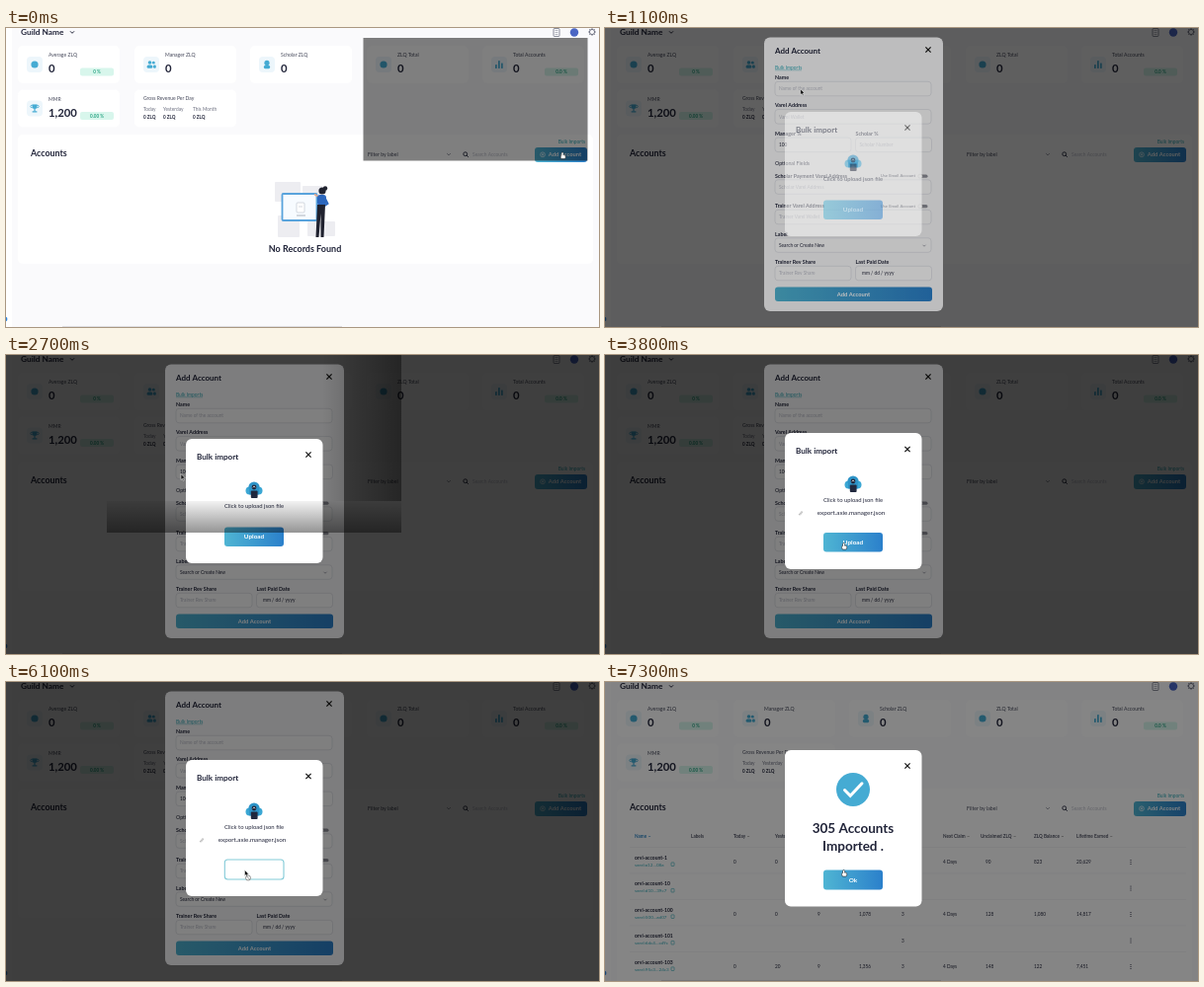
Animation of 600x303 px, one loop 7500 ms. Source, as an HTML page with a canvas:

```html
<!DOCTYPE html>
<html lang="en">
<head>
<meta charset="utf-8">
<title>Bulk import</title>
<style>
html,body{margin:0;width:100%;height:100%;overflow:hidden;background:#fff}
canvas{display:block;width:600px;height:303px}
</style>
</head>
<body>
<canvas id="stage"></canvas>
<script>
const W = 600, H = 303, LOOP = 7500, STEP = 100;
const UI = 'Lato, "Open Sans", sans-serif', SYS = 'Inter, Roboto, sans-serif';
const INK = '#22253a', SOFT = '#6d7080', HINT = '#bcbec9', TEAL = '#2fa8b5', BLUE = '#45abd3';
const cv = document.getElementById('stage'), c = cv.getContext('2d');
const dpr = window.devicePixelRatio || 1;
cv.width = W * dpr; cv.height = H * dpr;

// helpers
function text(s, x, y, size, color = INK, weight = 400, align = 'left', family = UI) {
  c.font = `${weight} ${size}px ${family}`;
  c.fillStyle = color; c.textAlign = align;
  c.fillText(s, x, y);
}
function box(x, y, w, h, r, fill, stroke, lw = .6) {
  c.beginPath(); c.roundRect(x, y, w, h, r);
  if (fill) { c.fillStyle = fill; c.fill(); }
  if (stroke) { c.strokeStyle = stroke; c.lineWidth = lw; c.stroke(); }
}
function dot(x, y, r, fill) {
  c.beginPath(); c.arc(x, y, r, 0, 7); c.fillStyle = fill; c.fill();
}
function line(pts, color, lw = 1) {
  c.beginPath();
  pts.forEach(([x, y], i) => i ? c.lineTo(x, y) : c.moveTo(x, y));
  c.strokeStyle = color; c.lineWidth = lw; c.stroke();
}
function poly(pts, fill) {
  c.beginPath();
  pts.forEach(([x, y]) => c.lineTo(x, y));
  c.closePath(); c.fillStyle = fill; c.fill();
}
function clipTo(x, y, w, h, draw) {
  c.save(); c.beginPath(); c.rect(x, y, w, h); c.clip(); draw(); c.restore();
}
function faded(a, draw) {
  if (a <= 0) return;
  c.save(); c.globalAlpha = a; draw(); c.restore();
}
const chevron = (x, y, s, col, lw = .8) => line([[x - s, y - s / 2], [x, y + s / 2], [x + s, y - s / 2]], col, lw);
const shade = a => { c.fillStyle = `rgba(0,0,0,${a})`; c.fillRect(0, 0, W, H); };
function cross(x, y) {
  line([[x - 2.6, y - 2.6], [x + 2.6, y + 2.6]], '#111', 1.2);
  line([[x + 2.6, y - 2.6], [x - 2.6, y + 2.6]], '#111', 1.2);
}
function button(x, y, w, h, label, size = 6, dx = 0) {
  const g = c.createLinearGradient(x, 0, x + w, 0);
  g.addColorStop(0, '#4fb5d3'); g.addColorStop(1, '#2b80cb');
  box(x, y, w, h, 3, g);
  text(label, x + w / 2 + dx, y + h / 2 + size * .34, size, '#fff', 700, 'center');
}

// dashboard
const icons = {
  blob(x, y) { dot(x, y, 3.6, BLUE); },
  users(x, y) {
    dot(x - 1.5, y - 2, 1.8, BLUE); dot(x + 2.3, y - 1.8, 1.4, BLUE);
    box(x - 4.4, y + .6, 5.8, 3.2, 1.5, BLUE); box(x + 2, y + .6, 2.8, 3.2, 1.2, BLUE);
  },
  person(x, y) { dot(x, y - 1.6, 2.6, BLUE); box(x - 3.2, y + 1, 6.4, 3.2, 1.4, BLUE); },
  bars(x, y) { [[-4, 4], [-1, 8], [2, 5.5]].forEach(([d, h]) => box(x + d, y + 4 - h, 1.7, h, .4, BLUE)); },
  cup(x, y) {
    box(x - 2.4, y - 4, 4.8, 4.6, [0, 0, 2.4, 2.4], BLUE);
    box(x - 4.2, y - 3.2, 8.4, 2.4, 1.2, null, BLUE, .8);
    box(x - .6, y, 1.2, 3, 0, BLUE); box(x - 2.4, y + 2.8, 4.8, 1.2, .3, BLUE);
  }
};
function card(x, y, icon, label, value, pill) {
  box(x, y, 103, 38, 5, '#fff');
  box(x + 9, y + 11, 16, 16, 4, '#edf6fb');
  icons[icon](x + 17, y + 19);
  text(label, x + 31, y + 11, 5.1, '#45485a');
  text(value, x + 31, y + 27, 11.3, INK, 700);
  if (pill) {
    box(x + 63, y + 22.5, 34, 8, 2, '#d8f6ec');
    text(pill, x + 80, y + 28.3, 4.6, '#29a483', 700, 'center');
  }
}
function emptyArt() {
  [[272, 156, 26, 20], [300, 160, 20, 14], [275, 190, 22, 22], [305, 196, 28, 15]]
    .forEach(r => box(...r, 1, '#ededf1'));
  box(279.5, 168, 35, 27, 1, '#f7fbff', '#58a3dc', 1.8);
  box(294, 177, 8, 10, 1, '#fff', '#b9c0cc', .6);
  line([[296, 181], [300, 181]], '#b9c0cc', .6);
  line([[294, 190], [303, 190]], '#8d94a3', .7);
  dot(320, 165, 3.6, '#20222f'); dot(323, 162.5, 2.2, '#20222f');
  line([[318, 172], [312, 168.5]], '#e3a98f', 1.6);
  box(315, 169, 9, 11, 3, '#2c67bd');
  line([[322, 171], [325.5, 178], [321, 181]], '#2c67bd', 2);
  poly([[315, 179], [323, 179], [321.5, 212], [318.5, 212], [318.5, 188], [316.5, 212], [313.5, 212]], '#20222f');
  text('No Records Found', 302.5, 227, 9, INK, 700, 'center');
}
const heads = [[30, 'Name'], [87, 'Labels'], [130, 'Today'], [172, 'Yesterday'], [215, 'Average'], [257, 'Total'],
  [300, 'Rank'], [342, 'Next Claim'], [380, 'Unclaimed ZLQ'], [434, 'ZLQ Balance'], [477, 'Lifetime Earned']];
const cols = [130, 172, 215, 257, 300, 342, 385, 434, 477];
const rows = [
  ['1', 'a12…08a', '0|0|9|1,078|3|4 Days|90|823|20,629'],
  ['10', 'd10…39c7', ''],
  ['100', '500…ad07', '0|0|9|1,078|3|4 Days|128|1,080|14,817'],
  ['101', '6dc4…cd9c', '||||3'],
  ['103', '95c3…24c3', '0|20|9|1,356|3|4 Days|148|122|7,451']
];
function table() {
  heads.forEach(([x, s], i) => {
    text(s, x, 158, 4.6, i ? '#4d5061' : '#2d86c4', 700);
    if (i !== 1) chevron(x + c.measureText(s).width + 3, 156.5, 1, i ? '#777' : '#2d86c4', .6);
  });
  rows.forEach(([id, addr, vals], i) => {
    const y = 179.5 + i * 26.5;
    line([[25, y - 12], [588, y - 12]], '#ececf0', .6);
    text('orvi-account-' + id, 30, y, 5, INK, 700);
    text('varel:' + addr, 30, y + 7, 4.6, TEAL);
    box(67, y + 3.4, 3, 3.6, .5, null, TEAL, .6);
    vals.split('|').forEach((v, k) => text(v, cols[k], y + 4.5, 4.7));
    [-2, 0, 2].forEach(d => dot(532, y + 3 + d, .6, INK));
  });
}
function page(full) {
  c.fillStyle = '#fff'; c.fillRect(0, 0, W, H);
  c.fillStyle = '#fafafc'; c.fillRect(6, 0, W - 6, H);
  text('Guild Name', 15, 7, 8.3, INK, 700);
  chevron(67, 4.3, 2, INK, 1);
  box(554, .5, 6, 8, 1, null, SOFT, .8);
  [2.5, 4.5, 6.5].forEach(y => line([[555.5, y], [558.5, y]], SOFT, .5));
  dot(575, 4.5, 4.2, '#4b66c4');
  c.beginPath(); c.arc(593, 4, 2.6, 0, 7); c.strokeStyle = SOFT; c.lineWidth = 1; c.stroke();
  for (let a = 0; a < 6.2; a += Math.PI / 4)
    line([[593 + 2.8 * Math.cos(a), 4 + 2.8 * Math.sin(a)], [593 + 3.9 * Math.cos(a), 4 + 3.9 * Math.sin(a)]], SOFT, .9);

  card(12, 18, 'blob', 'Average ZLQ', '0', '0 %');
  card(130, 18, 'users', 'Manager ZLQ', '0');
  card(247, 18, 'person', 'Scholar ZLQ', '0');
  card(365, 18, 'blob', 'ZLQ Total', '0');
  card(482, 18, 'bars', 'Total Accounts', '0', '0.0 %');
  card(12, 62.5, 'cup', 'MMR', '1,200', '0.00 %');
  box(130, 62.5, 103, 38, 5, '#fff');
  text('Gross Revenue Per Day', 139, 73, 5, '#45485a');
  [[139, 'Today'], [159, 'Yesterday'], [189, 'This Month']].forEach(([x, s]) => {
    text(s, x, 84, 4.8, SOFT); text('0 ZLQ', x, 92, 4.6, INK, 700);
  });

  box(12, 108, 582, full ? 200 : 131, 5, '#fff');
  text('Accounts', 25, 129.5, 8.9, INK, 700);
  text('Filter by label', 366, 130, 5.2, '#45485a');
  chevron(448, 128, 1.8, SOFT, .7);
  c.beginPath(); c.arc(464.7, 127.7, 1.9, 0, 7); c.strokeStyle = INK; c.lineWidth = .9; c.stroke();
  line([[466, 129], [467.8, 130.8]], INK, .9);
  text('Search Accounts', 472, 130, 4.9, HINT);
  text('Bulk Imports', 586, 117, 4.9, TEAL, 400, 'right');
  button(535, 121, 53, 15, 'Add Account', 5.8, 4);
  c.beginPath(); c.arc(543, 128.3, 2.4, 0, 7); c.strokeStyle = '#fff'; c.lineWidth = .6; c.stroke();
  line([[541.8, 128.3], [544.2, 128.3]], '#fff', .6); line([[543, 127.1], [543, 129.5]], '#fff', .6);
  full ? table() : emptyArt();
  dot(-1, 295, 2.4, '#2d86e0');
  line([[57, 302.5], [340, 302.5]], '#dedee2', 1);
}

// dialogs
function field(label, x, y, w, hint, dark) {
  text(label, x, y, 5.3, INK, 700);
  box(x, y + 2.3, w, 14.5, 3, '#fff', '#d5d7df');
  text(hint, x + 4, y + 11.4, 4.8, dark ? INK : HINT);
}
function toggle(y) {
  text('Use Email Account', 314, y, 4.3, INK, 400, 'right');
  box(317.5, y - 2.6, 9, 3.2, 1.6, '#8f9099');
  dot(319, y - 1, 2.1, '#fff');
  c.strokeStyle = '#bbb'; c.lineWidth = .4; c.stroke();
}
function addDialog() {
  box(161, 9.5, 181, 277.5, 6, '#fcfcfd');
  text('Add Account', 172, 26.3, 8, INK, 700);
  cross(327, 22);
  text('Bulk Imports', 172, 41.8, 4.9, TEAL);
  line([[172, 42.8], [199, 42.8]], TEAL, .4);
  field('Name', 172, 52, 158, 'Name of the account');
  field('Varel Address', 172, 80.3, 158, 'Varel Wallet');
  field('Manager %', 172, 108.8, 77, '100', true);
  field('Scholar %', 253.5, 108.8, 77, 'Scholar Number');
  text('Optional Fields', 172, 138.8, 5.3);
  field('Scholar Payment Varel Address', 172, 151.5, 158, 'Scholar Varel Address');
  toggle(151.2);
  field('Trainer Varel Address', 172, 182, 158, 'Trainer Varel Wallet');
  toggle(181.7);
  field('Label', 172, 210.5, 158, 'Search or Create New', true);
  chevron(323, 220.5, 1.5, SOFT, .6);
  field('Trainer Rev Share', 172, 239, 77, 'Trainer Rev Share');
  field('Last Paid Date', 253.5, 239, 77, '  mm / dd / yyyy', true);
  button(172, 262.5, 159, 14.5, 'Add Account', 5.8);
}
function cloud(x, y) {
  dot(x - 4.5, y + 1, 4, '#3ba7d4'); dot(x + 4.5, y + 1, 4, '#3ba7d4');
  dot(x, y - 2.5, 5.6, '#2e94c8'); box(x - 5, y, 10, 5, 1, '#2e94c8');
  box(x - 3.2, y + 1, 6.8, 7.5, 1, '#20283e');
  dot(x, y - 2.5, 2.4, '#20283e');
  line([[x - 1.2, y - 2.2], [x, y - 3.6], [x + 1.2, y - 2.2]], '#fff', .7);
}
function fileName() {
  line([[196, 162], [199, 158.5], [199.6, 159.5], [197, 162.5]], '#888', .6);
  text('export.axie.manager.json', 249, 162, 6.3, INK, 400, 'center');
}
function bulkDialog(named, busy) {
  const d = named ? 6 : 0;
  box(182, 85 - d, 138.5, 126.5 + 2 * d - .5, 6, '#fff');
  text('Bulk import', 193, 106 - d, 8.1, INK, 700);
  cross(306, named ? 95.5 : 101);
  cloud(251, 136.5 - d);
  text('Click to upload json file', 251, 154.5 - d, 5.9, INK, 400, 'center');
  if (named) fileName();
  const y = named ? 180 : 174.5;
  if (busy) box(221.3, y, 59.7, 20, 3, '#fff', '#83cbd8', 1.1);
  else button(221, y, 60, 19.5, 'Upload', 6.4);
}
function tick() {
  dot(251, 109, 17, BLUE);
  c.lineCap = 'round';
  line([[242.5, 109.5], [248.2, 115.3], [260, 102.8]], '#fff', 3);
  c.lineCap = 'butt';
}
function partDone() {
  box(182, 79, 138.5, 138, 6, '#fff');
  cross(306, 95.5);
  tick();
  clipTo(205, 140, 70, 8.5, () => text('305 Accounts', 251, 152, 13.5, INK, 700, 'center'));
  text('file', 283, 148.5, 5.9, INK, 400, 'right');
  fileName();
  box(222, 180, 59, 20, 3, '#f6f6f8', '#ebebee');
  text('Upload', 251.5, 192, 6.2, '#c9c9cf', 700, 'center');
}
function doneDialog() {
  box(182, 69, 138.5, 158.5, 6, '#fff');
  cross(306, 85);
  tick();
  text('305 Accounts', 251, 152.5, 13.5, INK, 700, 'center');
  text('Imported .', 251, 170.5, 13.5, INK, 700, 'center');
  button(221, 190.5, 60, 20, 'Ok', 6.4);
}

// file picker
const sys = (s, x, y, size = 5, col = '#dcdcde', wt = 400, al = 'left') => text(s, x, y, size, col, wt, al, SYS);
function doc(x, y) {
  poly([[x, y], [x + 11, y], [x + 17, y + 6], [x + 17, y + 23], [x, y + 23]], '#ececec');
  poly([[x + 11, y], [x + 17, y + 6], [x + 11, y + 6]], '#bdbdbd');
  for (let i = 0; i < 6; i++) line([[x + 3, y + 5 + i * 2], [x + 6 + i * 3 % 5, y + 5 + i * 2]], '#b9b9b9', .5);
}
function picker() {
  box(101, -8, 300, 188, 5, '#1d1d1f', '#48484b', .8);
  box(102, -8, 53, 187, [0, 0, 0, 5], '#29292c');
  box(155, -8, 245, 30, 0, '#2c2c2f');
  line([[155, 0], [155, 179]], '#0d0d0e', .7);
  [[163, 8.5], [172.5, 8.5], [185, 16], [204, 16]].forEach(([x, w]) => box(x, 6.5, w, 7.5, 1.5, '#4c4c4f'));
  line([[168, 8.5], [166.3, 10.2], [168, 12]], '#999', .7);
  line([[176, 8.5], [177.7, 10.2], [176, 12]], '#999', .7);
  [189, 208].forEach(x => { for (let i = 0; i < 3; i++) box(x + i * 2, 9, 1.2, 2.6, 0, '#ccc'); chevron(x + 9, 10.3, 1, '#ccc', .6); });
  box(233, 6.5, 85, 7.5, 2, '#4c4c4f');
  box(243, 8, 6, 4.5, .8, '#39a9e6');
  sys('Downloads', 251, 12.2);
  box(310, 7, 7, 6.5, 1.5, '#2473e5');
  chevron(313.5, 11.6, 1.1, '#fff', .6);
  line([[312.4, 9.3], [313.5, 8.2], [314.6, 9.3]], '#fff', .6);
  box(335, 6.5, 58, 7.5, 2, '#343437', '#535356', .5);
  c.beginPath(); c.arc(340, 10, 1.4, 0, 7); c.strokeStyle = '#aaa'; c.lineWidth = .6; c.stroke();
  sys('Search', 345, 12.1, 5, '#98989b');

  box(104, 32.7, 50, 9, 2, '#4a4a4d');
  [['Favorites', 9], ['Locations', 53], ['Tags', 75.5]].forEach(([s, y]) => sys(s, 107, y, 4.2, '#858588', 600));
  [['Recents', 18], ['Desktop', 28.8], ['Downloads', 39], ['Network', 62]].forEach(([s, y], i) => {
    c.beginPath(); c.arc(111.5, y - 1.8, 1.9, 0, 7);
    c.strokeStyle = i < 3 ? '#3f97e8' : '#aaa'; c.lineWidth = .7; c.stroke();
    sys(s, 116.5, y);
  });
  [['Orange', '#f29b38'], ['Yellow', '#f4d23f'], ['Local', '#5fc454'], ['Dev', '#3a86f0'], ['Purple', '#a75bd1'], ['All Tags…', '#777']]
    .forEach(([s, col], i) => { const y = 84.3 + i * 10.4; dot(111.5, y - 1.8, 2, col); sys(s, 116.5, y); });

  [['Today', 30.5], ['Yesterday', 94], ['Previous 7 Days', 158]].forEach(([s, y]) => sys(s, 163, y, 5.3, '#b5b5b8', 600));
  line([[163, 33.5], [394, 33.5]], '#333336', .6);
  line([[163, 97], [394, 97]], '#333336', .6);
  doc(169, 40); sys('test.json', 177.5, 71, 4.9, '#eee', 400, 'center');
  doc(169, 104);
  sys('export.axie.mana', 177.5, 134, 4.7, '#eee', 400, 'center');
  sys('ger.json', 177.5, 141, 4.9, '#eee', 400, 'center');
  box(396.3, 24, 2.8, 48, 1.4, '#77777a');
  box(155.4, 158.5, 244, 20.5, [0, 0, 5, 0], '#2a2a2d');
  [[163, 28, 'Options', '#f0f0f0', '#5c5c5f'], [336, 26, 'Cancel', '#f0f0f0', '#5c5c5f'], [366, 27, 'Open', '#79797c', '#39393c']]
    .forEach(([x, w, s, col, bg]) => { box(x, 165, w, 7.6, 1.8, bg); sys(s, x + w / 2, 170.6, 4.8, col, 400, 'center'); });
}
function pickerShadow() {
  const g = c.createLinearGradient(0, 148, 0, 180);
  g.addColorStop(0, 'rgba(0,0,0,.05)'); g.addColorStop(1, 'rgba(0,0,0,.42)');
  c.fillStyle = g; c.fillRect(102, 148, 298, 32);
  const s = c.createLinearGradient(320, 0, 400, 0);
  s.addColorStop(0, 'rgba(0,0,0,0)'); s.addColorStop(1, 'rgba(0,0,0,.4)');
  c.fillStyle = s; c.fillRect(275, 0, 125, 148);
}

// pointer
const path = [[0, 563, 126], [200, 563, 126], [700, 188, 39], [1000, 188, 39], [1400, 250, 185], [1600, 250, 185],
  [1800, 240.5, 134], [2300, 177, 120.5], [2800, 177, 120.5], [3600, 241.5, 190.5], [7500, 241.5, 190.5]];
function pointerAt(t) {
  const i = path.findIndex(p => p[0] > t), [t0, x0, y0] = path[i - 1], [t1, x1, y1] = path[i];
  const k = (t - t0) / (t1 - t0), e = k * k * (3 - 2 * k);
  return [x0 + (x1 - x0) * e, y0 + (y1 - y0) * e];
}
function arrow(x, y) {
  poly([[0, 0], [0, 6], [1.4, 4.8], [2.4, 7], [3.4, 6.5], [2.4, 4.4], [4.2, 4.2]].map(([a, b]) => [x + a, y + b]), '#111');
  c.strokeStyle = '#fff'; c.lineWidth = .5; c.stroke();
}
function hand(x, y) {
  box(x - .8, y, 1.7, 5, .8, '#fff', '#222', .6);
  box(x - 1.8, y + 2.6, 5, 4, 1.4, '#fff', '#222', .6);
  box(x - .5, y + .5, 1.1, 4, .5, '#fff');
}
function pointer(t, busy) {
  const [x, y] = pointerAt(t);
  if (t < 300 || (t > 600 && t < 1100) || (t >= 1400 && t < 1700) || (t >= 3500 && !busy)) hand(x, y);
  else arrow(x, y);
  if (busy) {
    c.beginPath(); c.arc(x + 3.5, y + 8, 2.5, 0, 7);
    c.fillStyle = '#fff'; c.fill();
    c.strokeStyle = '#666'; c.lineWidth = .7; c.stroke();
    line([[x + 1.8, y + 6.4], [x + 5.2, y + 9.6]], '#666', .7);
  }
}

function draw(t) {
  c.setTransform(dpr, 0, 0, dpr, 0, 0);
  const ramp = (from, len) => Math.max(0, Math.min(1, (t - from) / len));
  const busy = t >= 3900 && t < 6500;
  if (t >= 6700) {
    page(true); shade(.48); doneDialog();
  } else {
    page(false);
    if (t < 100) {
      c.fillStyle = 'rgba(0,0,0,.5)'; c.fillRect(361.5, 10, 227, 124.5);
    } else {
      shade(.5 * ramp(0, 200));
      faded(ramp(0, 200), addDialog);
    }
    const k = ramp(1000, 200);
    if (k) {
      shade(.5 * k);
      if (t >= 6600) {
        clipTo(0, 0, 275, 148, () => { page(false); shade(.36); });
        partDone();
      } else faded(k, () => bulkDialog(t >= 2800, busy));
    }
    if (t >= 1700 && t < 2600) picker();
    else if (t >= 2600 && t < 2800) pickerShadow();
  }
  pointer(t, busy);
}
function tickFrame(now) {
  draw(Math.floor(now % LOOP / STEP) * STEP);
  requestAnimationFrame(tickFrame);
}
const start = performance.now();
draw(0);
requestAnimationFrame(function run() {
  tickFrame.call(null, Math.max(0, performance.now() - start));
});
</script>
</body>
</html>
```
